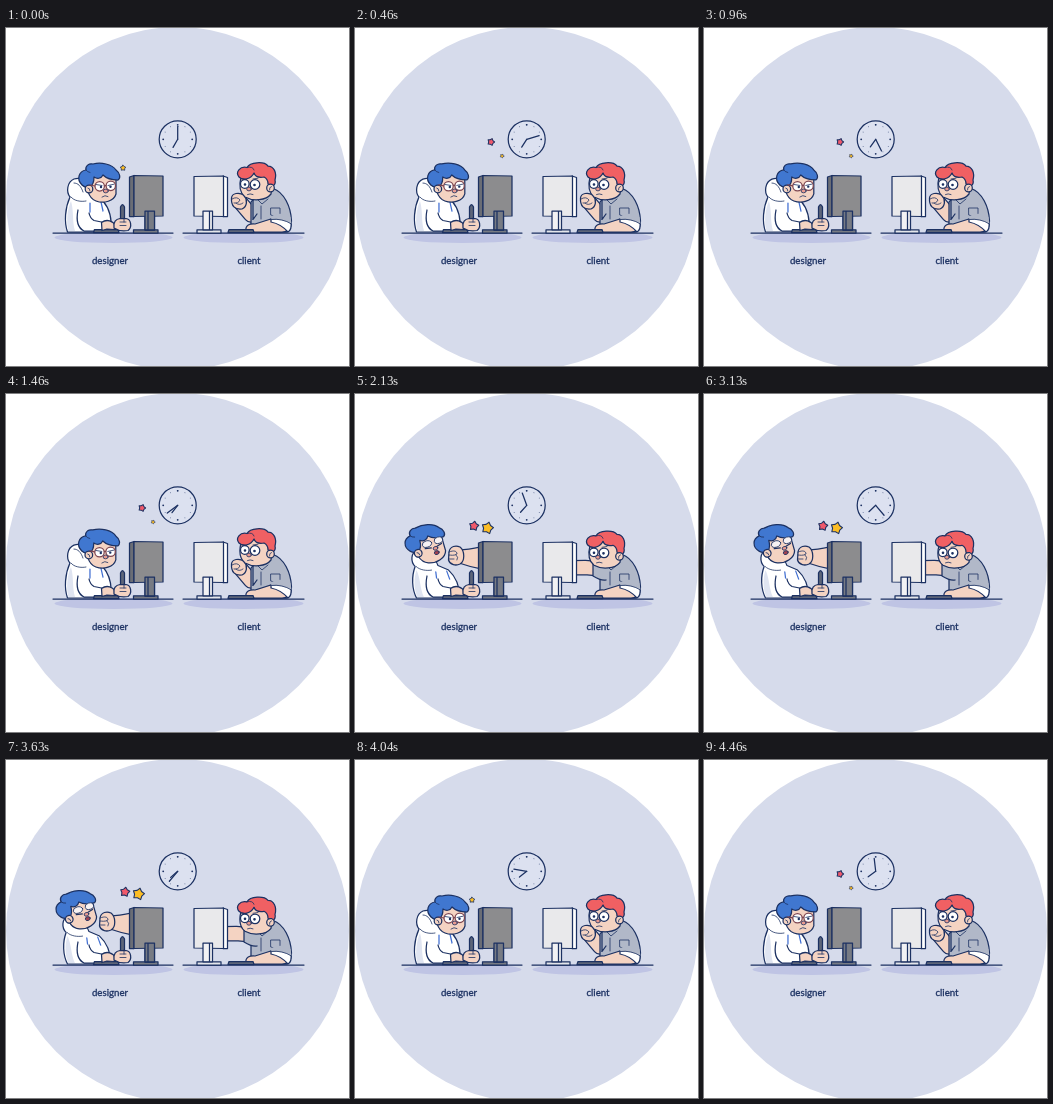
Animation of 343 by 338 pixels, one loop 4500 ms. Source, as an HTML page:

```html
<!DOCTYPE html>
<html lang="en">
<head>
<meta charset="utf-8">
<title>Designer and client</title>
<style>
  html, body { margin: 0; width: 100%; height: 100%; overflow: hidden; background: #fff; }
  svg { display: block; width: 100%; height: 100%; }
  .ink { stroke: #1c3162; stroke-width: 1.25; stroke-linecap: round; stroke-linejoin: round; fill: none; }
  .thin { stroke-width: .8; }
  .skin { fill: #f4d3c2; }
  .white { fill: #fff; }
  .blue { fill: #4077d0; }
  .red { fill: #f06063; }
  .shirt { fill: #b1b8c8; }
  .slate { fill: #5d6579; }
  .navy { fill: #1c3162; }
  .pink { fill: #e79a90; }
  .shade { fill: #bfc4e4; }
  .cast { fill: #dfe4f1; stroke: none; }
  text { font: 9.7px Lato, sans-serif; text-anchor: middle; fill: #1c3162; stroke: #1c3162; stroke-width: .3; }
</style>
</head>
<body>
<svg viewBox="0 0 343 338">
  <defs><clipPath id="screenClip"><path d="M0 0H126V338H0z"/></clipPath></defs>
  <circle cx="171.5" cy="170.5" r="171.5" fill="#d6dbeb"/>
  <ellipse class="shade" cx="107.5" cy="209.5" rx="59" ry="5.5"/>
  <ellipse class="shade" cx="237.5" cy="209.5" rx="60" ry="5.5"/>

  <g class="ink">
    <circle cx="171.7" cy="111.3" r="18.5" fill="#dce1f0"/>
    <g id="ticks"></g>
    <path id="hourHand" d="M171.7 111.3V102"/>
    <path id="minuteHand" d="M171.7 111.3V98.3"/>
  </g>

  <!-- designer -->
  <g class="ink">
    <g id="hoodie">
      <path class="white" d="M61.500 204C58 194 59 180 64 169C60 164 61 154 68 151C77 148 84 155 87 168L97 173C104 181 106 193 105 204z"/>
      <path class="cast" d="M62.500 203C60 195 61 182 65 173C68 183 66 193 69 203z"/>
      <path class="thin" d="M65 169C68 173 75 174 80 173M68 155C72 155 75 158 77 164"/>
      <path stroke="#416fd2" d="M84 175V184M95 174L97 183"/>
    </g>
    <g id="designerHead">
      <path class="skin" d="M82 150C80 160 82 170 90 173C98 176 108 173 110 166L110 148C100 143 88 144 82 150z"/>
      <path class="blue" d="M76 157C70 151 73 143 80 142C79 138 83 135 87 136C95 134 106 136 110 142C114 145 115 150 112 152C105 152 100 150 97 147C95 151 91 151 88 149C88 153 87 157 84 159C80 160 78 159 76 157z"/>
      <path class="thin" d="M80 142Q81 144 84 144.500"/>
      <circle class="skin" cx="83" cy="161" r="3.800"/>
      <path class="thin" d="M82 160Q84 160 84 163"/>
      <g id="calmFace">
        <path stroke="#7d4550" d="M84 157L89 158M98.500 157.500H100.500"/>
        <g class="white" stroke="#7d4550">
          <circle cx="93.700" cy="158.300" r="4.700"/><circle cx="104.800" cy="157.800" r="4.700"/>
        </g>
        <path class="thin" d="M90 156.500L96 157.500M102 157.500L108 156.200"/>
        <g class="navy" stroke="none"><circle cx="95" cy="159" r="1.200"/><circle cx="104.500" cy="158.700" r="1.200"/></g>
        <ellipse class="pink thin" cx="99.800" cy="163" rx="2.500" ry="1.900"/>
        <path class="thin" d="M96 169Q99 166.500 102 168.500"/>
      </g>
      <g id="hurtFace">
        <g class="thin" fill="#f7f2f3"><ellipse cx="94" cy="154.500" rx="4.800" ry="3.200"/><ellipse cx="106" cy="154" rx="4.300" ry="3.200"/></g>
        <path d="M91 158.500L97 159.500M103 159.500L108 158"/>
        <ellipse class="pink thin" cx="101" cy="161" rx="2.400" ry="1.800"/>
        <ellipse class="thin" cx="101" cy="165.500" rx="2.500" ry="1.900" fill="#a04250"/>
      </g>
    </g>
    <path class="white" d="M72 182C70 192 72 200 78 203H96L98 194.500L88 192.500Q84 190 83 185"/>
    <path class="slate" d="M88.500 201.500H112L113 204.500H87.500z"/>
    <path class="skin" d="M95.500 194.500C101 190.500 107 193 110 198L108 201.500L101 201L96 202.500z"/>
    <path class="slate" d="M114.500 179Q116.500 174 118.500 179V198H114.500z"/>
    <path class="skin" d="M108 200C107 194 110 191 114 190.500H120C125 191 126.500 199 122 202.500Q114 204 108 200z"/>
    <path class="thin" d="M114 194H120M114 197.500H120M118 190V194"/>
    <g clip-path="url(#screenClip)">
      <g id="fist">
        <path class="skin" d="M104 156Q114 156 130 152V175.500Q115 173 104 169z"/>
        <path class="skin" d="M94 158C95 152 101 151 105 153C110 157 110 167 105 170C101 172 95 171 93.500 166z"/>
        <path class="thin" d="M94 158C99 156 102 157 102 160C99 162 96 161 94 161M94 165H99M101 161Q104 163 102 166"/>
      </g>
    </g>
  </g>

  <!-- client -->
  <g class="ink">
    <path id="armEdge" style="stroke-width:15.700"/>
    <path id="armSkin" style="stroke:#f4d3c2;stroke-width:13.200"/>
    <g id="chinFist">
      <path class="skin" d="M225.500 170C226 165 233 164 238 167C242 172 241 179 236 181C229 182 225 178 225.500 170z"/>
      <path class="thin" d="M226 171Q231 168 234 172Q232 176 228 175M230 175Q233 178 237 175"/>
    </g>
    <path class="shirt" d="M245 204V174Q249 168 256 168L267 160.500C278 164 285 179 285.500 193Q285 202 281 204z"/>
    <path id="sleeve" class="shirt"/>
    <path class="thin" d="M250 170L256 176L262 171M255 178V191M265 180H274V187L269.500 188.500L265 187z"/>
    <g id="clientHead">
      <path class="skin" d="M235 149C233 157 234 165 239 169C247 173.500 260 172.500 265 166L267 150C258 144 244 144 235 149z"/>
      <path class="red" d="M233 149C229 144 234 138 241 139.500C244 134 258 133 262 138C268 138 271 145 269 152Q270 156 267 158L262 156Q262 151 258 149C252 150 249 148 248 145C245 151 237 153 233 149z"/>
      <path class="thin" d="M241 139.500Q247 138 248 142"/>
      <circle class="skin" cx="264.500" cy="160" r="3.800"/>
      <path class="thin" d="M265.500 158.500Q263 159 263.500 162"/>
      <circle class="white" cx="238.800" cy="156" r="4.300"/><circle class="white" cx="249" cy="156.500" r="4.800"/>
      <circle class="navy" cx="239" cy="156.500" r=".7"/><circle class="navy" cx="248.500" cy="157" r=".7"/>
      <path class="thin" d="M236 150.800L240.500 151.500M247 151L252 150.200"/>
      <ellipse class="pink thin" cx="243" cy="161" rx="2.300" ry="1.900"/>
      <path class="thin" d="M241.500 166.500Q244 165.200 247 166.500"/>
    </g>
    <path class="skin" d="M240 203C239 197 244 195.500 249 196L268 190L282 196Q284 204 276 204H240z"/>
    <path class="white" d="M265 191Q276 190 285 194Q286 202 282 204Q275 196 265 194z"/>
    <path class="shirt" d="M265.500 188Q275 183 284.500 189L285.500 196Q276 191 265 192z" stroke="none"/>
    <path class="thin" d="M265 191.500Q276 190 285.500 196"/>
    <path class="slate" d="M223 201.500H247L248 204.500H222z"/>
  </g>

  <!-- desks and screens -->
  <g class="ink">
    <path d="M47 205H167M177 205H298"/>
    <path fill="#777b84" d="M127.500 201.800H152V205H127.500z"/>
    <path fill="#777b84" d="M139 182H148.500V202H139z"/>
    <path d="M142 188V202"/>
    <path fill="#6a6d75" d="M123.500 149L128 147.500V188.500H123.500z"/>
    <path fill="#8c8c8e" d="M128 147.500L157 148V188L128 188.500z"/>
    <path fill="#777b84" d="M139 183H148.500V201.800H139zM142 183V201.800"/>
    <path fill="#e4e6eb" d="M191 201.800H215V205H191z"/>
    <path class="white" d="M217 148L221.500 149.500V188.500H217z"/>
    <path fill="#e9e9eb" d="M188 148.500L217.500 148V188.500L188 188z"/>
    <path fill="#f2f2f4" d="M197 183H206.500V201.800H197zM203.500 183V201.800"/>
  </g>

  <g class="ink">
    <path id="redStar" fill="#f0596b"/>
    <path id="yellowStar" fill="#fcbd25"/>
  </g>
  <text x="104" y="235.500">designer</text>
  <text x="243" y="235.500">client</text>
</svg>
<script>
const LOOP = 4500, FPS = 24, CYCLE = 500;
const $ = id => document.getElementById(id);
const set = (id, name, value) => $(id).setAttribute(name, value);
const show = (id, on) => set(id, 'visibility', on ? 'visible' : 'hidden');
const lerp = (a, b, k) => a + (b - a) * k;

// Each key is [time, ...values]; values are eased between keys.
function tween(keys, t, ease = k => k * k * (3 - 2 * k)) {
  if (t <= keys[0][0]) return keys[0].slice(1);
  const i = keys.findIndex(key => key[0] > t);
  if (i < 0) return keys[keys.length - 1].slice(1);
  const a = keys[i - 1], b = keys[i];
  const k = ease((t - a[0]) / (b[0] - a[0]));
  return a.slice(1).map((v, j) => lerp(v, b[j + 1], k));
}

const PUNCH = [[0, 0], [84, 1], [230, 1], [400, 0]];
const RECOIL = [[40, 0], [125, 1], [185, 1.12], [290, .8], [470, 0]];
// time, x, y, radius, rotation
const YELLOW = [[0, 117, 140, 2.8, 0], [125, 132.5, 134, 6, 15], [458, 147, 128, 2, 100], [500, 148, 127, 0, 110]];
const RED = [[20, 112, 142, 0, -20], [125, 119, 132, 4.8, 10], [458, 136, 114, 3.6, 90], [500, 138, 112, 0, 100]];
const easeOut = k => 1 - (1 - k) ** 1.7;

for (let i = 0; i < 12; i++) {
  $('ticks').innerHTML += `<circle class="navy" stroke="none" cx="171.7" cy="96.8" r="${i % 3 ? .4 : .9}" transform="rotate(${i * 30} 171.7 111.3)"/>`;
}

function drawStar(id, keys, t) {
  const [x, y, r, turn] = tween(keys, t, easeOut);
  show(id, r > .3);
  const points = Array.from({ length: 10 }, (_, i) => {
    const a = (turn + i * 36 - 90) * Math.PI / 180, d = i % 2 ? r * .65 : r;
    return `${x + d * Math.cos(a)} ${y + d * Math.sin(a)}`;
  });
  set(id, 'd', `M${points.join('L')}z`);
  set(id, 'style', `stroke-width:${Math.min(1.1, r * .3)}`);
}

function draw(time) {
  const t = Math.floor(time % LOOP * FPS / 1000) * 1000 / FPS;
  const phase = t % CYCLE, turn = t / LOOP;
  const [punch] = tween(PUNCH, phase), [recoil] = tween(RECOIL, phase);

  set('minuteHand', 'transform', `rotate(${turn * 720} 171.7 111.3)`);
  set('hourHand', 'transform', `rotate(${210 + turn * 24} 171.7 111.3)`);

  set('designerHead', 'transform', `translate(${-20.5 * recoil} ${-5 * recoil}) rotate(${-16 * recoil} 95 160)`);
  set('hoodie', 'transform', `translate(0 204) skewX(${7 * recoil}) scale(1 ${1 - .1 * recoil}) translate(0 -204)`);
  show('hurtFace', recoil > .3);
  show('calmFace', recoil <= .3);
  set('fist', 'transform', `translate(${(1 - punch) * 34} 0)`);
  show('fist', punch > .05);

  const arm = `M257 ${lerp(186, 176, punch)}L${lerp(245, 230, punch)} ${lerp(187, 173.5, punch)}L${lerp(234, 204, punch)} 174`;
  set('armEdge', 'd', arm);
  set('armSkin', 'd', arm);
  set('chinFist', 'transform', `translate(${-30 * punch} 0)`);
  const cuff = lerp(247, 238, punch);
  set('sleeve', 'd', `M257 168Q248 167 ${cuff} ${lerp(173, 167, punch)}L${cuff} ${lerp(191, 182, punch)}Q246 ${lerp(193, 187, punch)} 251 186`);
  set('clientHead', 'transform', `translate(0 ${2.3 * punch})`);

  drawStar('yellowStar', YELLOW, phase);
  drawStar('redStar', RED, phase);
}

const start = performance.now();
function tick() {
  draw(performance.now() - start);
  requestAnimationFrame(tick);
}
tick();
</script>
</body>
</html>
```
